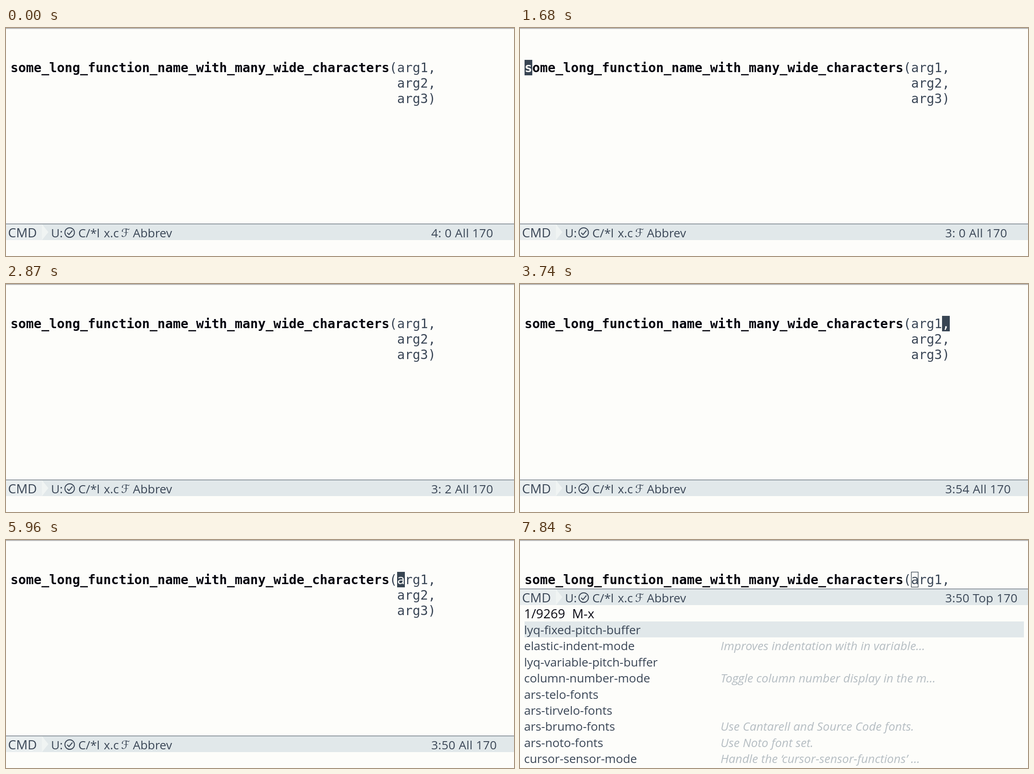
An HTML page for the animation above (8000 ms loop, 1117 px wide and 501 px high).

```html
<!DOCTYPE html>
<html lang="en">
<head>
<meta charset="utf-8">
<title>Editor session</title>
<style>
  html, body { margin: 0; width: 100%; height: 100%; overflow: hidden; background: #fdfdfa; }
  svg { display: block; }
  text { white-space: pre; fill: #3a4656; font: 26.2px "Open Sans", sans-serif; }
  .code text { font: 28.24px "DejaVu Sans Mono", monospace; }
  .code .bold { font-weight: bold; fill: #05050f; }
  .code .under { fill: #fdfdfa; }
  .note { font-style: italic; fill: #b6bec3; }
  .prompt { fill: #0a0a14; }
  .caps { font-size: 28px; }
  #place { letter-spacing: .35px; }
  .symbol { font: 25px "DejaVu Sans", "Noto Sans", sans-serif; }
  .icon { fill: none; stroke: #3a4656; stroke-width: 2; }
</style>
</head>
<body>
<svg width="1117" height="501" viewBox="0 0 1117 501">
  <rect width="1117" height="501" fill="#fdfdfa"/>
  <rect width="1117" height="2" fill="#b5b5b5"/>
  <g class="code">
    <text class="bold" x="10" y="97">some_long_function_name_with_many_wide_characters</text>
    <text x="843" y="97">(arg1,</text>
    <text x="860" y="131">arg2,</text>
    <text x="860" y="165">arg3)</text>
    <g id="cursor">
      <rect width="17" height="34" fill="#384553"/>
      <text id="glyph" class="under" y="27"></text>
    </g>
  </g>
  <g id="menu">
    <rect y="104" width="1117" height="397" fill="#fdfdfa"/>
    <rect x="860.5" y="70.5" width="15" height="33" fill="none" stroke="#384553" stroke-width="1.3"/>
    <rect x="10" y="179" width="1098" height="35" fill="#e1e8ea"/>
    <text class="prompt caps" x="9" y="171.5">1/9269</text>
    <text class="prompt caps" x="114.5" y="171.5">M-x</text>
    <rect id="bar" x="173" y="145" width="2.5" height="33" fill="#384553"/>
  </g>
  <g id="status">
    <rect y="430" width="1117" height="36" fill="#e1e8ea"/>
    <path d="M0 431H79L93 448.5L79 466H0z" fill="#e9eeef"/>
    <path d="M79 431L93 448.5L79 466z" fill="#f0f4f3"/>
    <rect y="429.8" width="1117" height="1.4" fill="#6a7480"/>
    <text class="caps" x="4.5" y="459.5">CMD</text>
    <text x="99" y="459.5">U:</text>
    <circle class="icon" cx="140" cy="449.5" r="10.5"/>
    <path class="icon" d="M134.5 450L138.5 454L146 445"/>
    <text x="159" y="459.5">C/*l</text>
    <text x="215" y="459.5">x.c</text>
    <text class="symbol" x="253" y="459">ℱ</text>
    <text x="279" y="459.5">Abbrev</text>
    <text id="place" x="935" y="459.5"></text>
  </g>
</svg>
<script>
const $ = id => document.getElementById(id);
const LOOP = 8000, MENU_AT = 6340, BLINK = 500;
const lines = {
  3: 'some_long_function_name_with_many_wide_characters(arg1,',
  4: ' '.repeat(50) + 'arg2,',
  5: ' '.repeat(50) + 'arg3)'
};
const commands = [
  ['lyq-fixed-pitch-buffer'],
  ['elastic-indent-mode', 'Improves indentation with in variable…'],
  ['lyq-variable-pitch-buffer'],
  ['column-number-mode', 'Toggle column number display in the m…'],
  ['ars-telo-fonts'],
  ['ars-tirvelo-fonts'],
  ['ars-brumo-fonts', 'Use Cantarell and Source Code fonts.'],
  ['ars-noto-fonts', 'Use Noto font set.'],
  ['cursor-sensor-mode', 'Handle the ‘cursor-sensor-functions’ …']
];
// Each cursor step: time, line, column, visible
const steps = [
  [0, 4, 0, 0], [470, 4, 0, 1], [960, 4, 0, 0], [1470, 4, 0, 1],
  [1680, 3, 0, 1], [2140, 3, 1, 1], [2370, 3, 2, 1], [2870, 3, 2, 0], [3370, 3, 2, 1],
  [3480, 3, 55, 1], [3740, 3, 54, 1], [3940, 3, 53, 1], [4100, 3, 52, 1],
  [4290, 3, 51, 1], [4450, 3, 50, 1],
  [4870, 4, 50, 1], [5120, 5, 50, 1], [5490, 4, 50, 1], [5690, 3, 50, 1]
];

function addText(parent, x, y, content, className) {
  const node = document.createElementNS('http://www.w3.org/2000/svg', 'text');
  node.setAttribute('x', x);
  node.setAttribute('y', y);
  node.setAttribute('class', className);
  node.textContent = content;
  parent.append(node);
}

commands.forEach(([name, note], i) => {
  const y = 207 + 35.4 * i;
  addText($('menu'), 9, y, name, 'name');
  if (note) addText($('menu'), 441, y, note, 'note');
});

const show = (id, on) => $(id).setAttribute('visibility', on ? 'visible' : 'hidden');

function draw(t) {
  const menuOpen = t >= MENU_AT;
  const [, line, column, visible] = steps.findLast(step => step[0] <= t);
  const bold = line === 3 && column < 49;

  $('cursor').setAttribute('transform', `translate(${10 + 17 * column} ${70 + 34 * (line - 3)})`);
  $('glyph').textContent = lines[line][column] || '';
  $('glyph').style.fontWeight = bold ? 'bold' : 'normal';
  show('cursor', visible && !menuOpen);

  $('menu').style.display = menuOpen ? '' : 'none';
  show('bar', menuOpen && Math.floor((t - MENU_AT) / BLINK) % 2 === 0);
  $('status').setAttribute('transform', `translate(0 ${menuOpen ? -323 : 0})`);
  $('place').textContent = `${line}:${String(column).padStart(2)} ${menuOpen ? 'Top' : 'All'} 170`;
}

const start = performance.now();
function tick() {
  draw((performance.now() - start) % LOOP);
  requestAnimationFrame(tick);
}
tick();
</script>
</body>
</html>
```
